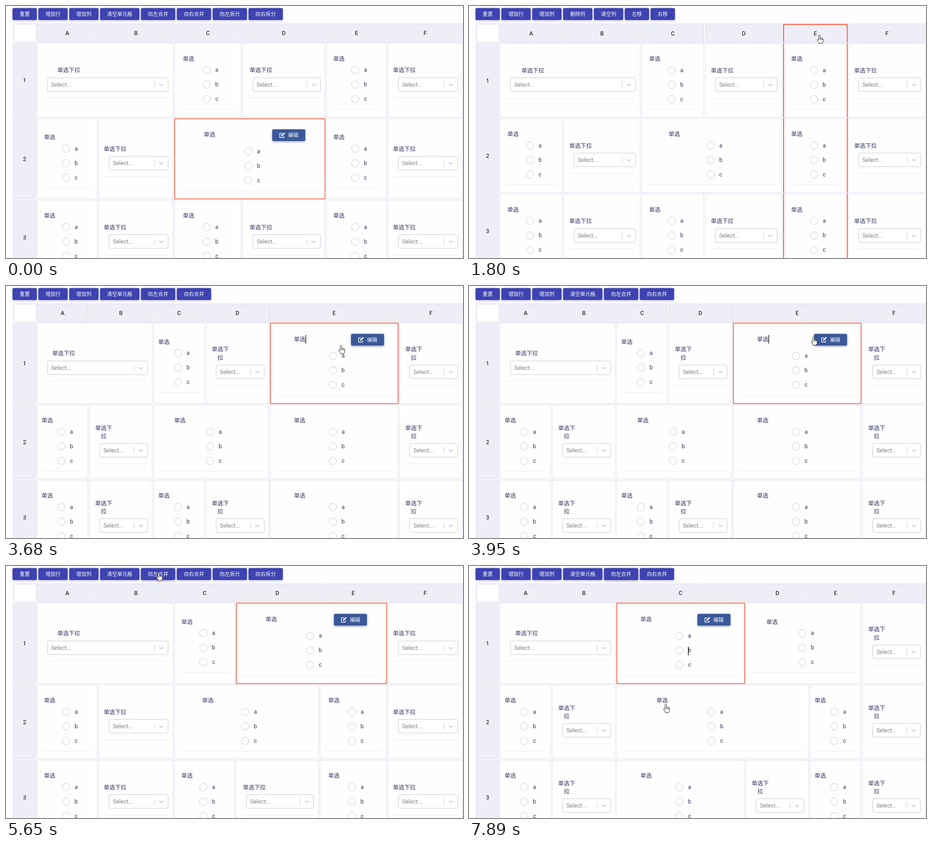
Animation, 1008 px wide and 556 px high, one loop 7990 ms. Source, as an HTML page with a canvas:

```html
<!DOCTYPE html>
<html lang="zh">
<head>
<meta charset="utf-8">
<style>
  html, body { margin: 0; width: 100%; height: 100%; overflow: hidden; background: #fefefe; }
  canvas { display: block; width: 100vw; height: 100vh; }
</style>
</head>
<body>
<canvas width="1008" height="556"></canvas>
<script>
const ctx = document.querySelector('canvas').getContext('2d');
const LOOP = 7990, PRESS = 155, BLINK = 530;
const INK = '#30335f', RED = '#f4563b', GRID = '#dcdcf0', HEAD = '#eeeef6';

const CELL_TOOLS = '重置 增加行 增加列 清空单元格 向左合并 向右合并';
const SPLIT_TOOLS = CELL_TOOLS + ' 向左拆分 向右拆分';
const COLUMN_TOOLS = '重置 增加行 增加列 删除列 清空列 左移 右移';

// Each word is a cell: R = radios, S = select; its length is the column span.
const LOWER_ROWS = ['R S RR R S', 'R S R S R S'];
// The selection starts at column `col`; without a row it is the whole column.
const states = [
  { from: 0, tools: SPLIT_TOOLS, top: 'SS R S R S', row: 1, col: 2, span: 2 },
  { from: 1520, tools: COLUMN_TOOLS, top: 'SS R S R S', col: 4, span: 1 },
  { from: 3680, tools: CELL_TOOLS, top: 'SS R S R S', row: 0, col: 4, span: 1 },
  { from: 5460, tools: SPLIT_TOOLS, top: 'SS R RR S', row: 0, col: 3, span: 2 },
  { from: 7470, tools: CELL_TOOLS, top: 'SS R RR S', row: 0, col: 2, span: 1 }
];

// Pointer moves along quadratic curves.
const START = [395, 20];
const moves = [
  { from: 70, to: 920, end: [773, 64], bend: [1100, 720] },
  { from: 2000, to: 2810, end: [739, 130], bend: [544, 184] },
  { from: 2810, to: 3290, end: [739, 131], bend: [805, 120] },
  { from: 3680, to: 3950, end: [760, 112] },
  { from: 3950, to: 4450, end: [808, 107] },
  { from: 4560, to: 5080, end: [337, 14], bend: [75, 5] },
  { from: 5790, to: 6380, end: [352, 100] },
  { from: 6500, to: 6910, end: [352, 137] },
  { from: 6910, to: 7080, end: [457, 178] },
  { from: 7470, to: 7890, end: [434, 305] }
];
const presses = [1110, 3290, 5080, 7080];
const blinkStarts = [1270, 3720, 7470];
const carets = [
  { from: 1270, x: 770, y: 51 }, { from: 1520, x: 761, y: 51 }, { from: 3290, x: 737, y: 108 },
  { from: 3680, x: 661, y: 108 }, { from: 5460, x: 855, y: 139 }, { from: 7080, x: 453.5, y: 171 },
  { from: 7470, x: 483.5, y: 178 }
];

const hand = new Path2D('M-1.6 1.6a1.6 1.6 0 0 1 3.2 0V7q1.3-.9 2.5.3q1.4-.7 2.3.5q1.7-.2 1.7 1.5V13q0 2-1.5 4v1.7h-7.6V17L-5 11.6q-.4-1.8 1.3-1.8l2.1 1.8Z');
const handLines = new Path2D('M1.6 7v3.5M4.1 7.5v3M6.3 8v2.5');
const latest = (list, t) => list.filter(item => item.from <= t).pop();
const sum = list => list.reduce((a, b) => a + b, 0);

function text(str, x, y, color = INK, size = 12.5, align = 'center') {
  ctx.font = `${size}px Roboto, "Noto Sans CJK SC", "Noto Sans CJK", sans-serif`;
  ctx.fillStyle = color;
  ctx.textAlign = align;
  ctx.fillText(str, x, y + size * 0.36);
}

function line(color, width, ...points) {
  ctx.strokeStyle = color;
  ctx.lineWidth = width;
  ctx.beginPath();
  for (let i = 0; i < points.length; i += 2) ctx.lineTo(points[i], points[i + 1]);
  ctx.stroke();
}

function rule(left, right, y) {
  y = Math.floor(y) + .5;
  line('#ebedf1', 1, left, y, right, y);
}

function box(x, y, right, bottom, fill) {
  ctx.fillStyle = fill;
  ctx.fillRect(x, y, right - x, bottom - y);
  ctx.strokeStyle = GRID;
  ctx.lineWidth = 1;
  ctx.strokeRect(Math.round(x) + .5, y + .5, Math.round(right - x) - 1, bottom - y - 1);
}

function button(x, y, w, h, color, shadow = .28) {
  ctx.save();
  ctx.shadowColor = `rgba(50,50,110,${shadow})`;
  ctx.shadowBlur = 5;
  ctx.shadowOffsetY = 2;
  ctx.fillStyle = color;
  ctx.beginPath();
  ctx.roundRect(x, y, w, h, 3);
  ctx.fill();
  ctx.restore();
}

function toolbar(labels, t) {
  let x = 14.3;
  for (const label of labels.split(' ')) {
    const step = 11.05 * label.length + 34.9, w = step - 3.3;
    const lift = label === '清空单元格' && t > 4850 && t < 5460 ? 1 : 0;
    const focused = label === '向左合并' && t > 5080 + PRESS;
    button(x, 4.5 - lift, w, 26.5, '#3d43b0', focused ? .45 : .28);
    text(label, x + w / 2, 17.5 - lift, '#fff', 11.2);
    x += step;
  }
}

function editButton(x, y) {
  button(x, y, 73, 26, '#3b5998', .4);
  text('编辑', x + 46.5, y + 13, '#fff', 11.3);
  line('#fff', 1.4, x + 22.5, y + 9, x + 16.7, y + 9, x + 16.7, y + 18.3, x + 25.5, y + 18.3, x + 25.5, y + 14.5);
  line('#fff', 2.7, x + 20.3, y + 14.7, x + 27.4, y + 8);
}

function radios(left, right, mid, selected) {
  const w = right - left, cx = left + w / 2 - 3, shift = selected ? 6 : 0;
  text('单选', left + w / 4 - 11, mid - 47.5 - shift);
  ['a', 'b', 'c'].forEach((letter, i) => {
    const y = mid - 22.5 + 32 * i + shift;
    ctx.beginPath();
    ctx.arc(cx, y + .3, 8.2, 0, 7);
    ctx.fillStyle = '#fff';
    ctx.fill();
    ctx.strokeStyle = '#c6c9cf';
    ctx.lineWidth = 1;
    ctx.stroke();
    text(letter, cx + 22.5, y - .2);
  });
  rule(left, right, mid + 64.5 + shift);
  if (selected) editButton(left + w * .75 - 28.5, mid - 65);
}

function select(left, right, mid) {
  const w = right - left, cx = left + w / 4 - 10.5, wraps = w < 130, shift = wraps ? 9 : 0;
  if (wraps) {
    text('单选下', cx + 2, mid - 31);
    text('拉', cx + 2, mid - 12.5);
  } else text('单选下拉', cx, mid - 22);
  const x = Math.round(left + 11.5) + .5, y = Math.round(mid - 6 + shift) + .5, r = Math.round(right) - .5;
  ctx.beginPath();
  ctx.roundRect(x, y, r - x, 30, 3.5);
  ctx.fillStyle = '#fff';
  ctx.fill();
  ctx.strokeStyle = '#c9c9c9';
  ctx.lineWidth = 1;
  ctx.stroke();
  text('Select...', x + 8.2, y + 15, '#808080', 12.5, 'left');
  line('#ccc', 1, r - 30, y + 7, r - 30, y + 23);
  line('#c8c8c8', 1.7, r - 19.3, y + 13.3, r - 15, y + 17.6, r - 10.7, y + 13.3);
  rule(left, right, mid + 39 + shift);
}

// The selected columns need a minimum width; the others share what is left.
function columnEdges({ row, col, span }) {
  const total = 941, needed = row === undefined ? 144 : 235 + 50 * span;
  const weights = [...'RSRSRS'].map(kind => kind === 'R' ? .815 : 1);
  const chosen = sum(weights.slice(col, col + span)), rest = sum(weights) - chosen;
  let x = 68;
  return [x, ...weights.map((weight, i) => {
    const inside = i >= col && i < col + span;
    return x += weight * (inside ? needed / chosen : (total - needed) / rest);
  })];
}

function rowEdges({ row }) {
  let y = row === undefined ? 82 : 81.4;
  return [y, ...[0, 1, 2].map(r => y += r === row ? 180.5 : 166.2)].map(Math.round);
}

function table(state) {
  const cols = columnEdges(state), rows = rowEdges(state), headTop = 40;
  line('#e2e2f1', 1, 1008, 38.5, 15.5, 38.5, 15.5, 556);
  box(17, headTop, 66, rows[0] - 2, '#fff');
  [...'ABCDEF'].forEach((name, i) => {
    const x = cols[i], right = cols[i + 1] - 2;
    box(x, headTop, right, rows[0] - 1, HEAD);
    text(name, (x + right) / 2, (headTop + rows[0] - 2) / 2, '#000');
  });
  [state.top, ...LOWER_ROWS].forEach((cells, r) => {
    const top = rows[r], bottom = rows[r + 1] - 2, mid = (top + bottom) / 2;
    box(17, top, 66, bottom, HEAD);
    text(r + 1, 41, mid, '#000');
    let col = 0;
    for (const cell of cells.split(' ')) {
      const selected = state.row === r && state.col === col;
      const x = cols[col], right = cols[col += cell.length] - 2;
      box(x, top, right, bottom, '#fefefe');
      (cell[0] === 'R' ? radios : select)(x + 11, right - 10.5, mid, selected);
      if (selected) {
        ctx.strokeStyle = RED;
        ctx.lineWidth = 1.6;
        ctx.strokeRect(x + .8, top + .8, right - x - 1.2, bottom - top - 1.2);
      }
    }
  });
  if (state.row !== undefined) return;
  const left = cols[state.col] + 1, right = cols[state.col + 1] - 2.5;
  line(RED, 2, left, headTop + .8, right, headTop + .8);
  [headTop, ...rows].forEach((y, i, edges) => {
    for (const x of [left, right]) line(RED, 2, x, y, x, (edges[i + 1] ?? 558) - 1.5);
  });
}

function pointerAt(t) {
  let start = START;
  for (const { from, to, end, bend } of moves) {
    if (t < from) break;
    const k = Math.min(1, (t - from) / (to - from));
    const origin = start;
    start = end.map((e, i) => {
      const via = bend ? bend[i] : (origin[i] + e) / 2;
      return origin[i] * (1 - k) ** 2 + 2 * via * k * (1 - k) + e * k * k;
    });
  }
  return start.map(Math.round);
}

function pointer(t) {
  if (t < moves[0].from) return;
  ctx.save();
  ctx.translate(...pointerAt(t));
  ctx.fillStyle = '#fff';
  ctx.fill(hand);
  ctx.strokeStyle = '#222';
  ctx.lineWidth = 1;
  ctx.stroke(hand);
  ctx.stroke(handLines);
  if (presses.some(down => t >= down && t < down + PRESS)) {
    ctx.beginPath();
    ctx.arc(0, 1.5, 12.5, 0, 7);
    ctx.fillStyle = 'rgba(245,230,0,.64)';
    ctx.fill();
  }
  ctx.restore();
}

function caret(t) {
  const spot = latest(carets, t);
  if (!spot) return;
  const since = t - blinkStarts.filter(start => start <= t).pop();
  if (Math.floor(since / BLINK) % 2) return;
  ctx.fillStyle = '#000';
  ctx.fillRect(spot.x - .5, spot.y, 1.3, 19);
}

function draw(t) {
  const state = latest(states, t);
  ctx.fillStyle = '#fefefe';
  ctx.fillRect(0, 0, 1008, 556);
  table(state);
  toolbar(state.tools, t);
  caret(t);
  pointer(t);
}

const began = performance.now();
function tick() {
  draw((performance.now() - began) % LOOP);
  requestAnimationFrame(tick);
}
tick();
</script>
</body>
</html>
```
